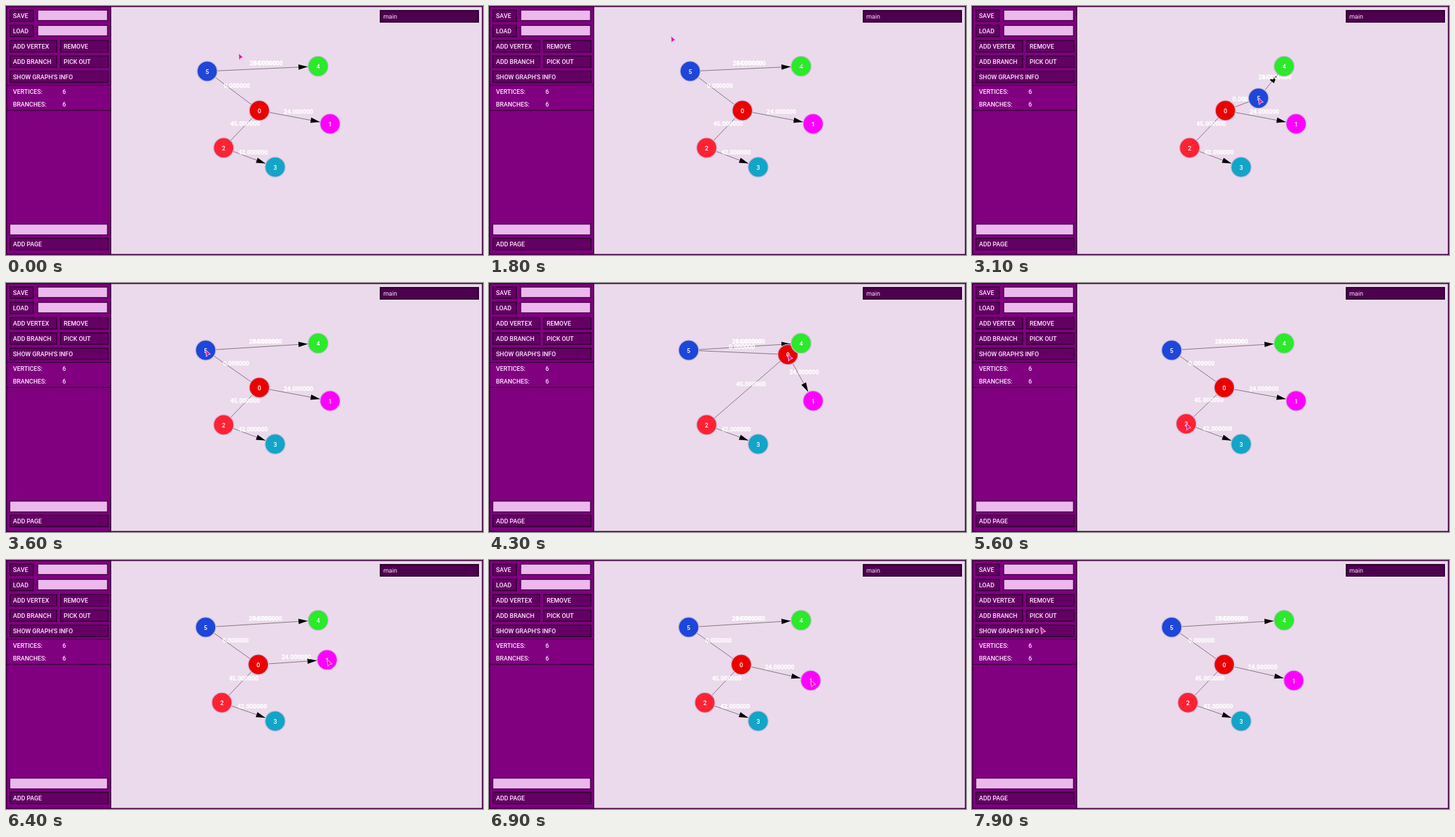
An HTML page for the animation above (8000 ms loop, 716 px wide and 374 px high).

```html
<!DOCTYPE html>
<html lang="en">
<head>
<meta charset="utf-8">
<title>Graph editor</title>
<style>
  html, body { margin: 0; width: 100%; height: 100%; overflow: hidden; background: #ebdaeb; }
  svg { display: block; width: 100%; height: 100%; }
  text { font: 500 9.25px Roboto, Arial, sans-serif; fill: #ffe6ff; }
  .panel { fill: #800080; }
  .button { fill: #640064; stroke: #3e0040; stroke-width: 2; }
  .input { fill: #ebb9eb; stroke: #520054; stroke-width: 1.7; }
  .rule { fill: #3e0040; }
  .tab { fill: #4d004d; stroke: #300032; stroke-width: 2; }
  .tab-name { font-weight: 400; }
  .edge { stroke: #1c141c; stroke-width: .6; opacity: .85; }
  .weight { font-weight: 700; font-size: 9.1px; fill: #fff; stroke: #fff; stroke-width: .25; text-anchor: middle; }
  .node circle { stroke: #cbbcd9; stroke-width: 1.3; }
  .node text { fill: #fff; text-anchor: middle; }
  .cursor { fill: #e619a8; stroke: #f0cdee; stroke-width: .9; stroke-linejoin: round; }
</style>
</head>
<body>
<svg id="stage" viewBox="0 0 716 374" preserveAspectRatio="none"></svg>
<script>
const LOOP = 8000, STEP = 100;
const stage = document.getElementById('stage');

function set(el, attrs) {
  for (const key in attrs) el.setAttribute(key, attrs[key]);
}
function add(parent, tag, attrs, text) {
  const el = document.createElementNS('http://www.w3.org/2000/svg', tag);
  set(el, attrs);
  if (text !== undefined) el.textContent = text;
  parent.appendChild(el);
  return el;
}
function rect(x, y, width, height, cls) {
  add(stage, 'rect', { x, y, width, height, class: cls });
}
function box(x, y, w, h, cls) {
  rect(x + 1, y + 1, w - 2, h - 2, cls);
}
function label(x, y, text, cls = '') {
  add(stage, 'text', { x, y: y + 3.4, class: cls }, text);
}
function button(x, y, w, text) {
  box(x, y, w, 19, 'button');
  label(x + 5.5, y + 9.8, text);
}

function buildPanel() {
  const left = 5, width = 149, row = i => 5 + 23 * i;
  rect(0, 0, 158, 374, 'panel');
  ['SAVE', 'LOAD'].forEach((text, i) => {
    button(left, row(i), 37, text);
    box(46.5, row(i), 107, 18, 'input');
  });
  [['ADD VERTEX', 'REMOVE'], ['ADD BRANCH', 'PICK OUT']].forEach(([a, b], i) => {
    button(left, row(i + 2), 72, a);
    button(81, row(i + 2), 73, b);
  });
  button(left, row(4), width, "SHOW GRAPH'S INFO");
  ['VERTICES:', 'BRANCHES:'].forEach((text, i) => {
    label(10.5, 128.7 + 18.6 * i, text);
    label(84.7, 128.7 + 18.6 * i, 6);
  });
  box(left - .5, 326.5, width, 18.5, 'input');
  button(left, 348, width, 'ADD PAGE');
  for (const y of [118.5, 156]) rect(0, y, 158, 1.5, 'rule');
  for (const y of [0, 372.5]) rect(0, y, 716, 1.5, 'rule');
  for (const x of [0, 156.4, 714.4]) rect(x, 0, 1.6, 374, 'rule');
  box(561, 6, 149, 19, 'tab');
  label(566.5, 15.6, 'main', 'tab-name');
}

const nodes = [
  { x: 380.3, y: 157, color: '#eb0000' },
  { x: 486.5, y: 177, color: '#ff00ff' },
  { x: 326.7, y: 213, color: '#ff2234' },
  { x: 404, y: 242, color: '#12a5c8' },
  { x: 468.5, y: 90.5, color: '#2aea2a' },
  { x: 302, y: 98, color: '#1e46d8' }
];
const edges = [
  { from: 0, to: 1, weights: [24], arrow: true },
  { from: 2, to: 0, weights: [45] },
  { from: 2, to: 3, weights: [42], arrow: true },
  { from: 5, to: 4, weights: [284, 0], arrow: true },
  { from: 5, to: 0, weights: [0] }
];

// Pointer moves: an arc passes "via" halfway; a dragged node follows the pointer.
const home = [349, 71];
const moves = [
  { from: 700, until: 900, to: [330, 50] },
  { from: 1100, until: 1400, to: [273, 45] },
  { from: 2200, until: 2600, to: [302, 97.5] },
  { from: 2600, until: 3600, to: [299.7, 100.5], via: [430, 138], drag: 5 },
  { from: 3700, until: 4000, to: [380.3, 156.5] },
  { from: 4000, until: 4700, to: [378.7, 156.5], via: [450, 106], drag: 0 },
  { from: 4700, until: 5100, to: [326.7, 212.5] },
  { from: 5100, until: 5600, to: [321.5, 211], via: [317, 219], drag: 2 },
  { from: 5600, until: 5700, to: [324, 213.7], drag: 2 },
  { from: 5700, until: 6000, to: [486, 176.5] },
  { from: 6000, until: 6400, to: [482, 149.5], via: [494, 172], drag: 1 },
  { from: 6400, until: 6900, to: [483, 180.5], drag: 1 },
  { from: 7000, until: 7700, to: [60, 94] },
  { from: 7700, until: 7900, to: [103.3, 101] }
];

function arc(a, b, via, k) {
  return a.map((p, i) => {
    const straight = p + (b[i] - p) * k;
    return via ? straight + 4 * k * (1 - k) * (via[i] - (p + b[i]) / 2) : straight;
  });
}
function poseAt(t) {
  const spots = nodes.map(n => [n.x, n.y]);
  let pointer = home;
  for (const m of moves) {
    if (t < m.from) break;
    const k = Math.min(1, (t - m.from) / (m.until - m.from));
    pointer = arc(pointer, m.to, m.via, k);
    if ('drag' in m) spots[m.drag] = [pointer[0], pointer[1] + .5];
  }
  return { pointer, spots };
}

function buildGraph() {
  const [lines, weights, discs] = ['lines', 'weights', 'discs'].map(id => add(stage, 'g', { id }));
  for (const e of edges) {
    e.line = add(lines, 'line', { class: 'edge' });
    if (e.arrow) e.head = add(lines, 'path', { d: 'M-15.5 0l-14 -4v8z' });
    e.texts = e.weights.map(w => add(weights, 'text', { class: 'weight' }, w.toFixed(6)));
  }
  nodes.forEach((n, id) => {
    n.el = add(discs, 'g', { class: 'node' });
    add(n.el, 'circle', { r: 15.1, fill: n.color });
    add(n.el, 'text', { y: 3.8 }, id);
  });
  return add(stage, 'path', { class: 'cursor', d: 'M0 0L7.3 6.4L4 7L1 10.3z' });
}

function draw(t) {
  const { pointer, spots } = poseAt(t);
  nodes.forEach((n, i) => set(n.el, { transform: `translate(${spots[i]})` }));
  for (const e of edges) {
    const [x1, y1] = spots[e.from], [x2, y2] = spots[e.to];
    set(e.line, { x1, y1, x2, y2 });
    if (e.head) {
      const angle = Math.atan2(y2 - y1, x2 - x1) * 180 / Math.PI;
      set(e.head, { transform: `translate(${x2} ${y2}) rotate(${angle})` });
    }
    for (const text of e.texts) set(text, { x: (x1 + x2) / 2 + 5.5, y: (y1 + y2) / 2 - 4.8 });
  }
  set(cursor, { transform: `translate(${pointer})` });
}

buildPanel();
const cursor = buildGraph();
const start = performance.now();
function tick() {
  const t = (performance.now() - start) % LOOP;
  draw(Math.floor(t / STEP) * STEP);
  requestAnimationFrame(tick);
}
tick();
</script>
</body>
</html>
```
